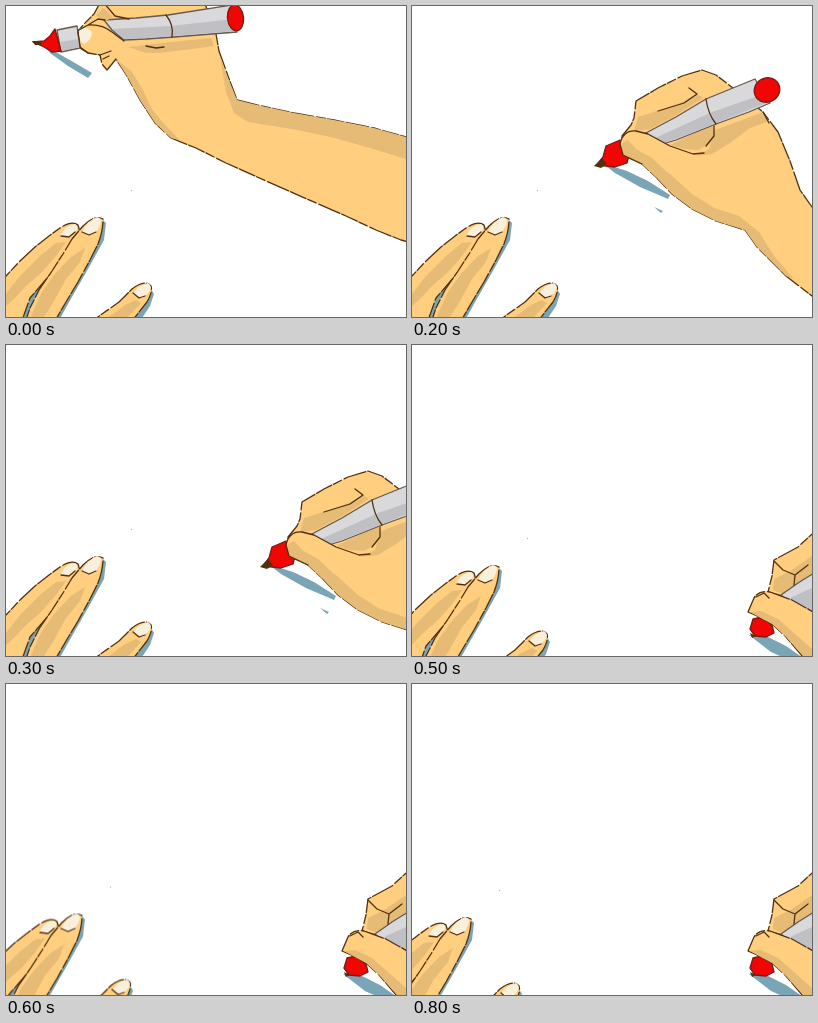
An HTML page that plays this animation: 400x311 px, repeating every 900 ms.

```html
<!DOCTYPE html>
<html lang="en">
<head>
<meta charset="utf-8">
<title>Hand with a marker</title>
<style>
html, body { margin: 0; width: 100%; height: 100%; overflow: hidden; background: #fff; }
svg { display: block; width: 100vw; height: 100vh; }

.skin, .steel, .red, .ink {
  stroke: #50300f; stroke-width: 1.3; stroke-linecap: round; stroke-linejoin: round;
}
.skin { fill: #ffce7e; stroke-dasharray: 17 2 9 3 23 2; }
.steel { fill: #d9d9dc; stroke: #66574f; }
.red { fill: #f20505; stroke: #7c1a10; }
.nail { fill: #f8f0dc; }
.ink { fill: none; }
.shade { fill: #e5bb76; }
.dim { fill: #c0c0c4; }
.shadow { fill: #79a5b7; }
.tip { fill: #50300f; }

/* nine equal steps of 100 ms */
.pose, .rest { animation: 900ms step-end infinite; }
.pose { visibility: hidden; }
.a { animation-name: first; }
.b { animation-name: second; }
.c { animation-name: third; }
.d { animation-name: last; }
.rest { animation-name: slide; }
@keyframes first { 0% { visibility: visible } 11.11%, 100% { visibility: hidden } }
@keyframes second { 0% { visibility: hidden } 11.11% { visibility: visible } 22.22%, 100% { visibility: hidden } }
@keyframes third {
  0% { visibility: hidden; transform: none }
  22.22% { visibility: visible; transform: none }
  33.33% { visibility: visible; transform: translate(72px, 62px) }
  44.44%, 100% { visibility: hidden; transform: none }
}
@keyframes last { 0% { visibility: hidden } 44.44%, 100% { visibility: visible } }
@keyframes slide {
  0% { transform: none }
  55.55% { transform: translate(-10px, 9px) }
  66.66% { transform: translate(-21px, 18.5px) }
  77.77% { transform: translate(-30px, 20px) }
  88.88%, 100% { transform: translate(-38px, 22px) }
}
</style>
</head>
<body>
<svg viewBox="0 0 400 311" preserveAspectRatio="none">

  <!-- resting hand -->
  <g class="rest">
    <path class="shadow" d="M96 213L100 217 98 234 82 263 62 298 50 320 38 320ZM36 276L22 290 12 320 26 320ZM145 283L148 288 144 300 132 318 122 318Z"/>
    <path class="skin" d="M-8 278L0 270 14 255 29 241 43 230 54 222Q66 214 72 219L74 226 64 242 48 264 37 277 24 292 14 320-8 320Z"/>
    <path class="shade" d="M0 288L14 270 34 250 50 237 60 236 50 250 36 266 20 280 8 293 0 300Z"/>
    <path class="skin" d="M18 320L24 302 33 284 46 265 57 248 66 233 77 220Q89 208 97 213 97 225 92 238L84 254 72 276 60 296 46 320Z"/>
    <path class="shade" d="M28 303L36 286 49 268 65 251 79 242 74 256 60 273 48 295 38 311 25 311Z"/>
    <path class="skin" d="M80 320L96 308 113 296 126 283Q139 273 145 280 147 286 141 296L126 315 118 324"/>
    <path class="shade" d="M103 311L119 299 130 294 135 297 122 311Z"/>
    <path class="nail" d="M54 230Q59 219 69 218 73 220 70 225L63 232ZM76 226Q81 215 91 211 97 212 94 219L90 227 83 229ZM127 288Q132 279 142 277 147 280 143 286L137 292Z"/>
    <path class="ink" d="M55 230L63 231 69 226M76 226L83 229 90 226M127 287L133 292 139 290" stroke-width=".6"/>
    <circle cx="125.5" cy="184.5" r=".7" fill="#b8b3ae"/>
  </g>

  <g class="pose a">
    <path class="shadow" d="M38 38L48 45 69 57 86 67 82 72 62 60 44 47Z"/>
    <path class="skin" d="M95 -5L88 8 78 18 72 25 74 42 82 47 94 49 96 58 101 64 106 58 110 53 121 70 134 94 149 117 165 132 190 142 220 157 260 175 301 193 340 210 370 224 395 234 420 241 420 136 400 131 368 122 328 114 288 107 251 99 231 94 222 70 213 45 210 28 198 -5Z"/>
    <path class="shade" d="M214 50L222 72 231 94 251 99 288 107 328 114 368 122 400 131V153L364 142 325 131 286 123 242 116 228 107 220 86ZM122 41L165 36 205 32 208 40 186 43 153 47 140 47ZM110 53L121 70 134 94 149 117 165 132 174 134 158 118 145 102 137 84 126 66Z"/>
    <path class="steel" d="M51 24L71 20 74 42 55 46Z"/>
    <path class="dim" d="M54 36L73 33 74 41 56 45Z"/>
    <path class="steel" d="M98 14L130 12 162 9 226 -1 231 26 168 31 140 33 118 34 106 24Z"/>
    <path class="dim" d="M106 23L164 20 228 13 230 25 168 30 140 32 118 33Z"/>
    <path class="ink" d="M160 9Q168 19 166 31"/>
    <ellipse class="red" cx="229.5" cy="12" rx="8" ry="13" transform="rotate(-6 229 12)"/>
    <path class="red" d="M27 36L38 35 44 30 49 23 55 45 46 46 38 41Z"/>
    <path class="tip" d="M26 35L34 35 36 39 29 39Z"/>
    <path class="nail" d="M73 23Q81 20 86 26 86 34 78 38 72 35 73 23Z"/>
    <path class="shade" d="M90 10L97 2 107 11 100 15Z"/>
    <path class="ink" d="M73 24L82 19Q96 18 106 26L118 35M72 26L74 41 82 47M82 19L92 13 99 14M97 -4L109 10 123 13M94 49L105 45M97 53L103 50M140 40L150 42 158 41"/>
  </g>

  <g class="pose b">
    <path class="shadow" d="M108 99L120 104 138 114 156 126 152 132 132 121 113 108Z"/>
    <path class="skin" d="M136 77L147 65 150 52 168 31 180 15 193 11 207 14 231 33 251 45 286 62 292 85 303 112 316 138 341 155 374 169 400 177 420 184 420 278 400 266 378 256 350 238 320 215 290 192 262 180 232 172 203 154 184 136 171 114 165 117 158 111 153 108 145 107 140 101 135 92Z"/>
    <path class="shade" d="M166 72L174 58 192 46 208 43 224 51 196 60ZM220 80L284 66 292 85 303 112 316 138 341 155 374 169 400 177V187L365 177 333 163 309 147 295 122 280 96 262 90 235 88ZM171 114L184 136 203 154 232 172 262 180 272 178 255 168 228 160 208 145 192 126 180 108 166 96 160 98Z"/>
    <path class="steel" d="M126 81L138 78 143 98 131 102Z"/>
    <path class="dim" d="M130 93L140 90 142 97 131 101Z"/>
    <path class="steel" d="M158 74L200 60 233 49 291 34 303 57 270 64 239 71 190 82 167 87Z"/>
    <path class="dim" d="M162 80L205 70 298 48 302 56 239 70 190 81 168 86Z"/>
    <path class="ink" d="M232 49Q240 59 238 71"/>
    <ellipse class="red" cx="298.5" cy="45" rx="7.5" ry="12" transform="rotate(-8 298 45)"/>
    <path class="red" d="M102 98L112 94 118 84 126 81 131 100 119 102 109 102Z"/>
    <path class="tip" d="M102 98L109 95 111 101 106 101Z"/>
    <path fill="#ffce7e" d="M136 83Q145 74 158 76L166 86 160 99 144 97 135 92Z"/>
    <path class="nail" d="M136 82Q143 76 150 80 153 88 145 94L136 92Z"/>
    <path class="ink" d="M138 80Q148 73 158 77L166 87M135 84L137 93 146 97 158 94M145 97L142 105M151 97L153 105 158 110M158 95L169 112M164 72L174 57 192 44 208 43 218 52M200 90Q215 95 225 88M152 51L171 50"/>
  </g>

  <g class="pose c">
    <path class="shadow" d="M190 157L215 165 236 175 258 189 256 193 228 181 203 167ZM242 201L251 205 249 207Z"/>
    <path class="skin" d="M210 130L219 119 222 112 224 95 246 82 270 70 290 64 304 69 321 82 351 106 366 126 378 155 388 184 400 201 430 245 430 318 400 290 374 270 345 241 333 224 304 215 280 203 260 188 244 171 230 158 211 149Z"/>
    <path class="shade" d="M226 111L248 104 271 96 285 88 291 92 261 111 238 123 222 125ZM258 139L300 119 303 130 297 138 286 144 272 143ZM303 124L349 107 357 115 338 122 318 137 300 148 284 150 297 143ZM211 149L230 158 244 171 260 188 280 203 304 215 333 224 345 241 374 270 382 273 362 250 347 226 327 210 302 202 280 188 258 168 240 150 222 142Z"/>
    <path class="steel" d="M232 128L264 111 294 93 343 73 358 97 337 106 304 118 264 134 247 139Z"/>
    <path class="dim" d="M241 133L300 106 352 88 357 96 304 117 264 133 247 138Z"/>
    <path class="ink" d="M294 93Q296 108 304 118"/>
    <ellipse class="red" cx="355" cy="84" rx="13" ry="12" transform="rotate(-28 355 84)"/>
    <path class="red" d="M185 159L191 151 194 140 208 134 217 149 215 157 203 161Z"/>
    <path class="tip" d="M182 160L190 152 195 158 189 162Z"/>
    <path fill="#ffce7e" d="M208 137Q211 124 224 125L236 128 258 140 281 151 274 170 244 165 229 155 211 149Z"/>
    <path class="shade" d="M209 138L216 134 224 143 240 152 258 169 262 180 244 171 230 158 211 149Z"/>
    <path class="ink" d="M230 158L211 149 208 138Q211 124 224 125L236 128 258 140 281 148 292 147M246 105L272 97 285 88 277 82M302 120L302 130 294 140M351 106L357 117"/>
  </g>

  <g class="pose d">
    <path class="shadow" d="M337 290L354 291 374 301 394 315 377 315 359 307Z"/>
    <path class="red" d="M341 274L350 272 360 280 362 288 354 292 343 291 338 284Z"/>
    <path class="tip" d="M338 288L344 291 340 293Z"/>
    <path class="skin" d="M410 181L399 190 386 202 362 215 360 231 356 247 374 252 410 236Z"/>
    <path class="shade" d="M362 234L380 225 400 211V230L384 240 373 250 361 245Z"/>
    <path class="steel" d="M369 250L386 238 410 223V275L388 266Z"/>
    <path class="dim" d="M378 253L400 243V265L388 261Z"/>
    <path class="skin" d="M336 267L342 253Q347 245 358 247L380 255 410 272V325L391 312 374 292 360 279 345 271Z"/>
    <path class="shade" d="M338 267L349 266 366 274 383 289 400 304V311H391L374 292 360 279 345 271Z"/>
    <path class="ink" d="M362 216L371 225 383 230 382 240M383 230L396 220M344 252L352 248 357 253"/>
  </g>
</svg>
</body>
</html>
```
